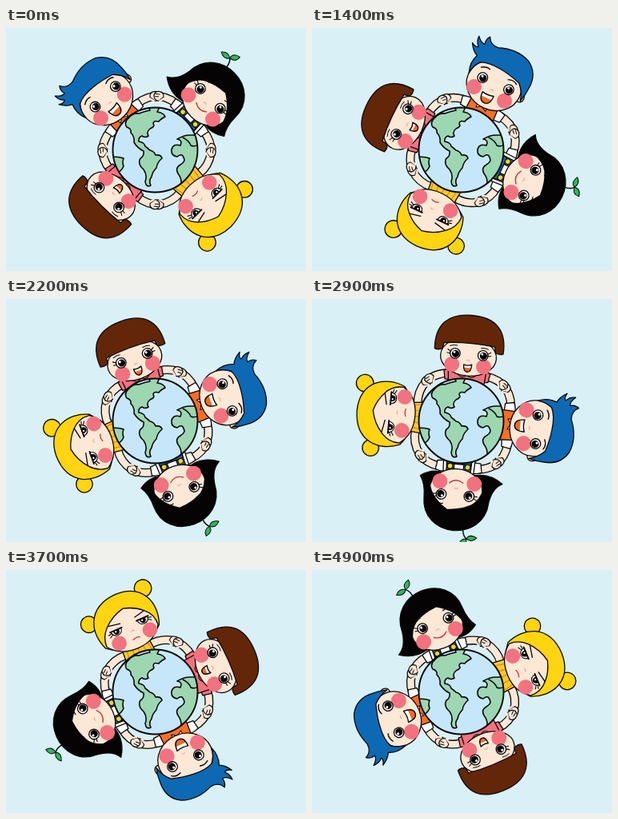
Recreate the animation shown at these times as an HTML page with a canvas. Size 375 by 304 pixels, loop 5000 ms.

```html
<!DOCTYPE html>
<html lang="en">
<head>
<meta charset="utf-8">
<title>Children around the globe</title>
<style>
html, body { margin: 0; width: 100%; height: 100%; overflow: hidden; background: #d8f0f6; }
canvas { display: block; width: 100vw; height: 100vh; }
</style>
</head>
<body>
<canvas width="375" height="304"></canvas>
<script>
const W = 375, H = 304, LOOP = 5000, STEP = 100;
const canvas = document.querySelector('canvas');
const scale = Math.max(1, window.devicePixelRatio || 1);
canvas.width = W * scale;
canvas.height = H * scale;
const ctx = canvas.getContext('2d');

const INK = '#0b0808', SKIN = '#fde7d5', CHEEK = '#f2727f', BLUE = '#0d69b3',
  BLACK = '#050304', YELLOW = '#ffd410', BROWN = '#642608', ORANGE = '#fb6d24',
  SEA = '#c6e7fa', LAND = '#9cd7b2', LEAF = '#2fb65a', LIP = '#c9343a';

// Ring angle in degrees at step numbers; the ring jumps back at the loop end.
const turn = [[0, 0], [7, 29], [14, 70], [22, 115], [29, 140], [37, 201], [49, 292.5]];

function ringAngle(step) {
  let i = 1;
  while (i < turn.length - 1 && step > turn[i][0]) i++;
  const [s0, a0] = turn[i - 1], [s1, a1] = turn[i];
  return a0 + (a1 - a0) * (step - s0) / (s1 - s0);
}

function paint(p, fill, stroke = INK, width = 1.3) {
  if (fill) { ctx.fillStyle = fill; ctx.fill(p); }
  if (stroke) { ctx.strokeStyle = stroke; ctx.lineWidth = width; ctx.stroke(p); }
}
const shape = (d, fill, stroke, width) => paint(new Path2D(d), fill, stroke, width);
const line = (d, color = INK, width = 1.2) => shape(d, null, color, width);

function oval(x, y, rx, ry, fill, stroke, width) {
  const p = new Path2D();
  p.ellipse(x, y, rx, ry, 0, 0, Math.PI * 2);
  paint(p, fill, stroke, width);
}
const dot = (x, y, r, fill, stroke = null, width) => oval(x, y, r, r, fill, stroke, width);

function mirrored(draw) {
  for (const side of [-1, 1]) {
    ctx.save();
    ctx.scale(side, 1);
    draw(side);
    ctx.restore();
  }
}

function arms(sleeve) {
  mirrored(() => {
    const arm = 'M17 -58Q32 -60 46 -50';
    line(arm, INK, 11);
    line(arm, SKIN, 8.4);
    if (sleeve) shape('M12 -64Q22 -65 29 -62L27 -51L12 -50Z', sleeve);
  });
}

function hands() {
  mirrored(() => {
    shape('M41 -53Q45 -58 50 -54Q54 -51 51 -46Q47 -42 42 -45Z', SKIN, INK, 1.2);
    line('M39.5 -52.5L41 -46', SKIN, 2.4);
    line('M47 -52L51 -49M46 -49L49 -46', INK, 1);
  });
}

function eye(x, y, side, lashes) {
  dot(x, y, 6.3, '#fff', INK, 1.3);
  dot(x + 0.6, y + 0.4, 4.6, BLACK);
  dot(x - 1, y - 1.6, 1.5, '#fff');
  if (lashes) {
    const lx = x + side * 5.5;
    line(`M${lx} ${y - 2}l${side * 4} -2.5M${lx + side * 0.5} ${y + 0.5}l${side * 4} -0.5`, INK, 1.1);
  }
}

function eyes(left, right, y, lashes) {
  eye(left, y, -1, lashes);
  eye(right, y, 1, lashes);
}

function cheeks(left, right, y, r = 9.5) {
  dot(left, y, r, CHEEK);
  dot(right, y, r, CHEEK);
}

const nose = (x, y) => line(`M${x - 2} ${y}q2 -2 4 0`, '#eea58c', 1.1);

function openMouth(x, y, w, h) {
  const d = `M${x - w} ${y}Q${x} ${y + 2} ${x + w} ${y - 0.5}Q${x + w} ${y + h} ${x} ${y + h}Q${x - w} ${y + h} ${x - w} ${y}Z`;
  const p = new Path2D(d);
  ctx.save();
  ctx.clip(p);
  paint(p, '#f26a26', null);
  ctx.fillStyle = '#fff';
  ctx.fillRect(x - w, y - 2, w * 2, h * 0.42 + 2);
  ctx.restore();
  paint(p, null, INK, 1.4);
}

function boy() {
  arms('#fff');
  shape('M-18 -66L18 -66L19 -44L-19 -44Z', ORANGE);
  shape('M-2 -60L-8 -64L-8 -56ZM-2 -60L5 -64L5 -56Z', '#fff', INK, 1);
  oval(37, -90, 5, 6, SKIN);
  oval(1, -90, 35, 31, SKIN);
  cheeks(-21, 21, -78);
  shape('M-34 -91Q-39 -104 -34 -115Q-41 -118 -46 -127Q-40 -123 -37 -126Q-42 -130 -42 -138Q-36 -131 -31 -132Q-33 -138 -29 -143Q-25 -134 -14 -135Q8 -144 27 -136Q44 -126 42 -105Q42 -96 39 -86Q37 -97 28 -106Q12 -111 0 -112Q-17 -114 -27 -109Q-33 -102 -34 -91Z', BLUE);
  line('M-23 -104q6 -4 11 -2M14 -104q7 -3 12 1', INK, 1.4);
  eyes(-16, 20, -93, false);
  nose(1, -83);
  openMouth(-1, -77, 7.5, 12);
}

function sprout() {
  line('M-12 -136Q-13 -143 -17 -146', INK, 1.5);
  shape('M-17 -146Q-21 -139 -30 -144Q-24 -151 -17 -146Z', LEAF, INK, 1);
  shape('M-17 -146Q-19 -154 -9 -156Q-8 -147 -17 -146Z', LEAF, INK, 1);
}

function sproutGirl() {
  sprout();
  shape('M-56 -74Q-44 -80 -41 -99C-40 -124 -20 -137 0 -137C22 -137 40 -122 40 -99Q40 -82 47 -72Q33 -62 18 -66L-22 -66Q-40 -62 -56 -74Z', BLACK);
  arms('#fff');
  shape('M-19 -65L19 -65L20 -44L-20 -44Z', '#fff');
  mirrored(() => shape('M6 -66L15 -66L16 -44L6 -44Z', BLUE));
  shape('M-15 -54L15 -54L17 -42L-17 -42Z', BLUE);
  dot(-11, -57, 3.3, YELLOW, INK, 1);
  dot(11, -57, 3.3, YELLOW, INK, 1);
  oval(1, -87, 33, 27, SKIN);
  cheeks(-21, 22, -77);
  shape('M-33 -82Q-39 -112 -8 -120Q28 -124 37 -96L34 -80Q31 -98 10 -111Q-8 -110 -20 -103Q-29 -97 -33 -82Z', BLACK, null);
  line('M-24 -103q5 -4 10 -3M16 -104q6 -2 10 3', INK, 1.2);
  eyes(-16, 19, -93, true);
  nose(1, -84);
  line('M-7 -77Q2 -71 10 -78', LIP, 1.4);
}

function sleepyEye(x, y, side) {
  shape(`M${x - 7} ${y - 2}L${x + 7} ${y - 2}Q${x + 6} ${y + 5} ${x} ${y + 5}Q${x - 6} ${y + 5} ${x - 7} ${y - 2}Z`, '#fff', INK, 1.1);
  shape(`M${x - 4} ${y - 2}h8q0 6 -4 6q-4 0 -4 -6Z`, BLACK, null);
  dot(x - 1, y, 1.2, '#fff');
  line(`M${x - 8} ${y - 2}h16`, INK, 1.8);
  const lx = x + side * 7;
  line(`M${lx} ${y}l${side * 4} 1M${lx - side} ${y + 2}l${side * 4} 2.5`, INK, 1.1);
}

function blonde() {
  dot(-43, -112, 10.3, YELLOW, INK, 1.3);
  dot(37, -126, 10.8, YELLOW, INK, 1.3);
  arms();
  shape('M-18 -66L18 -66L20 -44L-20 -44Z', '#ffc928');
  line('M-13 -62l-3 18M-6 -62l-2 18M1 -62v18M8 -62l2 18M15 -62l3 18', '#dc8e12', 1.4);
  shape('M-36 -76C-46 -100 -38 -132 2 -133C40 -132 48 -100 37 -76Q20 -62 2 -62Q-20 -62 -36 -76Z', YELLOW);
  shape('M4 -113Q-12 -110 -24 -99Q-34 -90 -34 -77Q-22 -60 2 -60Q25 -60 36 -77Q37 -91 27 -100Q18 -109 4 -113Z', SKIN);
  cheeks(-18, 24, -75, 9.3);
  line('M-22 -100L-7 -97M13 -97L27 -100', INK, 1.3);
  sleepyEye(-15, -90, -1);
  sleepyEye(21, -90, 1);
  nose(4, -82);
  line('M0 -72q5 -2 9 0', LIP, 1.3);
}

function bowlGirl() {
  arms(CHEEK);
  shape('M-24 -66L24 -66L22 -44L-22 -44Z', CHEEK);
  line('M-12 -59Q-6 -52 0 -58Q6 -52 12 -59', INK, 1);
  oval(0, -81, 35, 24, SKIN);
  cheeks(-20, 20, -70);
  shape('M-43 -88C-45 -118 -30 -133 0 -133C30 -133 45 -118 43 -88Q38 -86 33 -89L32 -96Q0 -100 -32 -96L-33 -89Q-38 -86 -43 -88Z', BROWN);
  eyes(-17, 18, -84, true);
  line('M-24 -93q5 -2 9 -1M15 -93q5 -1 9 1', INK, 1);
  nose(0, -76);
  openMouth(0, -71, 5, 9);
}

function globe() {
  const disc = new Path2D();
  disc.arc(186.5, 152.5, 53, 0, Math.PI * 2);
  paint(disc, SEA, null);
  ctx.save();
  ctx.clip(disc);
  // The Americas
  shape('M151 124Q147 118 153 113Q158 106 166 107Q174 104 180 103L178 97L192 99L189 105Q197 106 199 111Q193 114 191 117Q184 115 184 120Q187 123 180 126Q175 130 178 135Q174 138 170 135Q165 137 166 142Q173 143 174 148Q178 151 180 153Q185 154 187 159Q194 158 195 163Q189 168 188 175Q183 180 182 186Q178 191 181 197Q175 200 174 192Q177 184 172 177Q164 170 168 163Q173 160 172 154Q164 150 160 143Q161 136 156 131Q157 126 151 124Z', LAND, INK, 1.6);
  // Europe and Africa
  shape('M245 134L230 134Q222 134 214 139Q221 140 218 147Q209 144 207 152Q206 160 214 161Q220 156 222 162Q225 167 218 171Q211 175 215 182Q219 187 219 193Q224 201 234 193L248 180Z', LAND, INK, 1.6);
  line('M221 137Q229 141 231 147Q236 149 240 146', INK, 1.4);
  // Western edge
  shape('M128 162Q140 160 147 163Q145 168 147 173Q144 180 137 182L128 182Z', LAND, INK, 1.6);
  ctx.restore();
  paint(disc, null, INK, 1.9);
}

const kids = [boy, sproutGirl, blonde, bowlGirl];

function eachKid(angle, draw) {
  kids.forEach((kid, i) => {
    ctx.save();
    ctx.translate(188.5, 153);
    ctx.rotate((angle - 45 + i * 90) * Math.PI / 180);
    draw(kid);
    ctx.restore();
  });
}

function render(ms) {
  const angle = ringAngle(Math.floor(ms % LOOP / STEP));
  ctx.setTransform(scale, 0, 0, scale, 0, 0);
  ctx.lineJoin = 'round';
  ctx.lineCap = 'round';
  ctx.fillStyle = '#d8f0f6';
  ctx.fillRect(0, 0, W, H);
  eachKid(angle, kid => kid());
  eachKid(angle, hands);
  globe();
}

let start;
function tick(now) {
  start ??= now;
  render(now - start);
  requestAnimationFrame(tick);
}
render(0);
requestAnimationFrame(tick);
</script>
</body>
</html>
```
